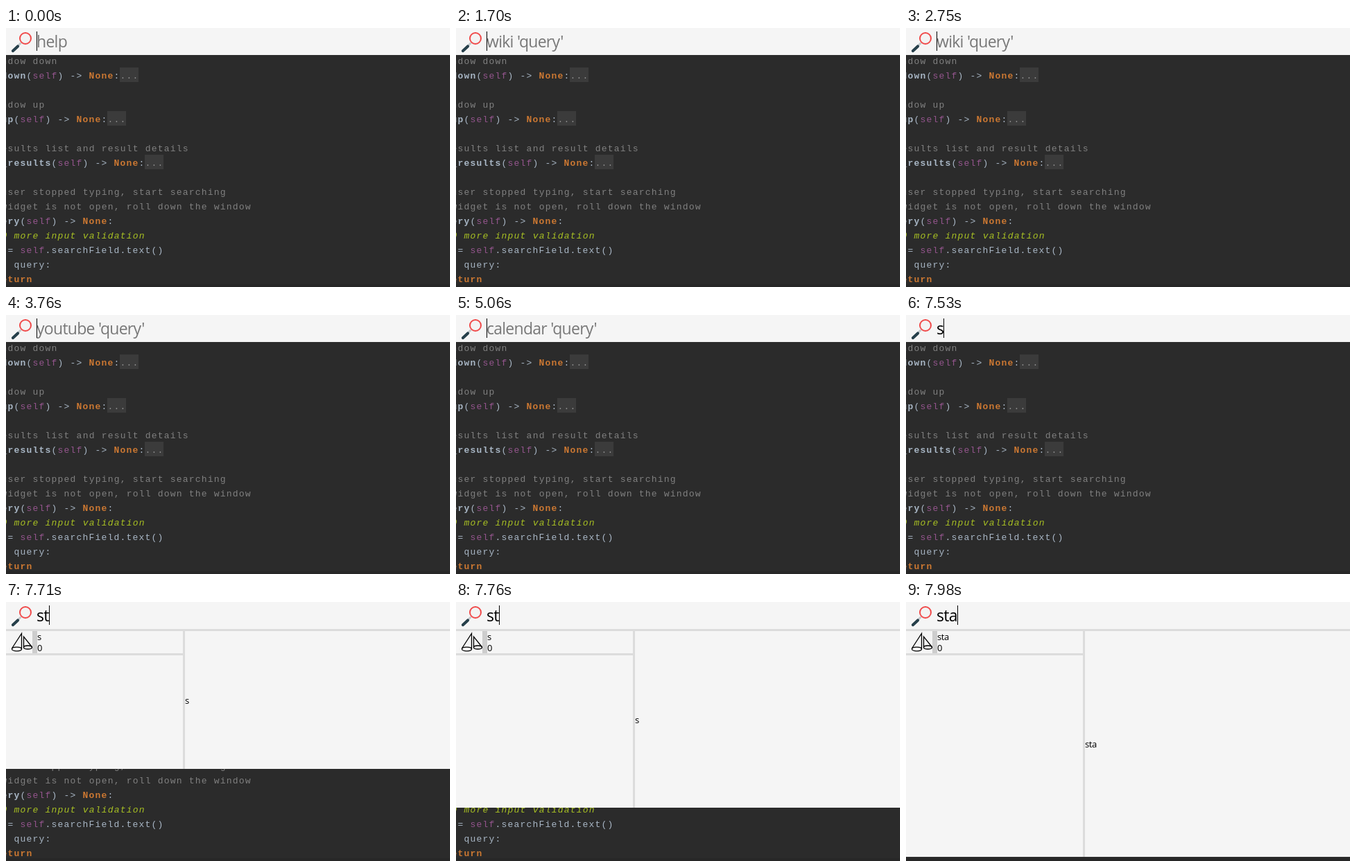
Animation, 640 px wide and 374 px high, one loop 8000 ms. Source, as an HTML page:

```html
<!DOCTYPE html>
<html lang="en">
<head>
<meta charset="utf-8">
<title>Search launcher</title>
<style>
  html, body { margin: 0; width: 100%; height: 100%; overflow: hidden; background: #2b2b2b; }
  svg { display: block; }
  text { white-space: pre; }
  #code text { font: 13px "Liberation Mono", monospace; letter-spacing: 1.2px; fill: #a9b7c6; }
  #code .comment { fill: #808080; }
  #code .name { font-weight: bold; }
  #code .self { fill: #94558d; }
  #code .key { fill: #cc7832; font-weight: bold; }
  #code .todo { fill: #a8c023; font-style: italic; }
  #code .fold { fill: #8c8c8c; }
  #field { font: 23px "Open Sans", "Noto Sans", sans-serif; letter-spacing: -.73px; }
  .small { font: 13px "Open Sans", "Noto Sans", sans-serif; letter-spacing: -.4px; }
</style>
</head>
<body>
<svg width="640" height="374" viewBox="0 0 640 374">
  <rect width="640" height="374" fill="#2b2b2b"/>
  <rect y="370" width="640" height="4" fill="#272727"/>
  <g id="code"></g>

  <g id="panel">
    <rect id="sheet" y="39" width="640" fill="#f5f5f5"/>
    <g fill="#dcdcdc">
      <rect y="39" width="640" height="3"/>
      <rect y="74" width="255" height="3"/>
      <rect id="divider" x="255" y="42" width="3"/>
    </g>
    <rect x="38" y="42" width="7" height="32" fill="#cdcdcd"/>
    <g fill="none" stroke="#000" stroke-width="1.3">
      <path d="M8.5 67 22.5 45.5V68M25.500 65V50L37.500 65"/>
      <ellipse cx="15.500" cy="68" rx="7" ry="2.800"/>
      <ellipse cx="31.500" cy="65.500" rx="6" ry="2.500"/>
    </g>
    <text id="title" class="small" x="45" y="55"></text>
    <text class="small" x="45" y="71">0</text>
    <text id="detail" class="small" x="258"></text>
  </g>

  <rect width="640" height="39" fill="#f5f5f5"/>
  <g fill="none">
    <path d="M17 26 21.500 21.500" stroke="#c3c9cc" stroke-width="3"/>
    <path d="M10 33 17 26.500" stroke="#263f4a" stroke-width="4.200" stroke-linecap="round"/>
    <circle cx="28" cy="15" r="8" fill="#f3f3f3" stroke="#f04b4b" stroke-width="2"/>
  </g>
  <text id="field" x="44" y="28"></text>
  <rect id="caret" y="5" width="1" height="28"/>
</svg>
<script>
const LOOP = 8000;
const CELL = 9, LEFT = -7, FIRST_BASELINE = 52, LINE = 21;
const $ = id => document.getElementById(id);

const method = name => [['name', name], ['', '('], ['self', 'self'], ['', ') -> '], ['key', 'None'], ['', ':']];
const folded = name => [...method(name), ['fold', '...']];
const comment = text => [['comment', text]];

const lines = [
  comment('ndow down'),
  folded('down'),
  [],
  comment('ndow up'),
  folded('up'),
  [],
  comment('esults list and result details'),
  folded('_results'),
  [],
  comment('user stopped typing, start searching'),
  comment('widget is not open, roll down the window'),
  method('ery'),
  [['todo', 'O more input validation']],
  [['', ' = '], ['self', 'self'], ['', '.searchField.text()']],
  [['key', 't'], ['', ' query:']],
  [['key', 'eturn']]
];

function codeLine(parts, row) {
  const y = FIRST_BASELINE + row * LINE;
  let column = 0;
  return parts.map(([kind, text]) => {
    const x = LEFT + column * CELL;
    column += text.length;
    const box = kind === 'fold'
      ? `<rect x="${x}" y="${y - 16}" width="${3 * CELL}" height="${LINE}" fill="#3b3b3b"/>` : '';
    return `${box}<text class="${kind}" x="${x + 0.6}" y="${y}">${text.replace('>', '&gt;')}</text>`;
  }).join('');
}
$('code').innerHTML = lines.map(codeLine).join('');

// Each track lists [start, value]; a value holds until the next start.
const hints = [[0, 'help'], [1190, "wiki 'query'"], [3070, "youtube 'query'"],
  [5060, "calendar 'query'"], [7040, "maps 'query'"]];
const typed = [[0, ''], [7530, 's'], [7710, 'st'], [7890, 'sta']];
const results = [[0, 's'], [7980, 'sta']];
const bottoms = [[0, 39], [7710, 241], [7760, 297], [7820, 350], [7890, 368]];
const blinks = [130, 640, 1150, 1700, 2210, 2750, 3250, 3760, 4320, 4830, 5340, 5890, 6380, 6890, 7440];
const caretX = [44, 54, 62, 74];

const at = (track, t) => track.filter(([start]) => start <= t).pop()[1];

function draw(t) {
  const query = at(typed, t);
  $('field').textContent = query || at(hints, t);
  $('field').setAttribute('fill', query ? '#000' : '#787878');

  const caretOn = query || blinks.filter(b => b <= t).length % 2 === 0;
  $('caret').setAttribute('x', caretX[query.length]);
  $('caret').setAttribute('visibility', caretOn ? 'visible' : 'hidden');

  const bottom = at(bottoms, t), open = bottom > 39;
  $('panel').setAttribute('display', open ? 'inline' : 'none');
  if (open) {
    $('sheet').setAttribute('height', bottom - 39);
    $('divider').setAttribute('height', bottom - 42);
    $('title').textContent = $('detail').textContent = at(results, t);
    $('detail').setAttribute('y', Math.round((42 + bottom) / 2 + 5));
  }
}

const began = performance.now();
function frame() {
  draw((performance.now() - began) % LOOP);
  requestAnimationFrame(frame);
}
frame();
</script>
</body>
</html>
```
